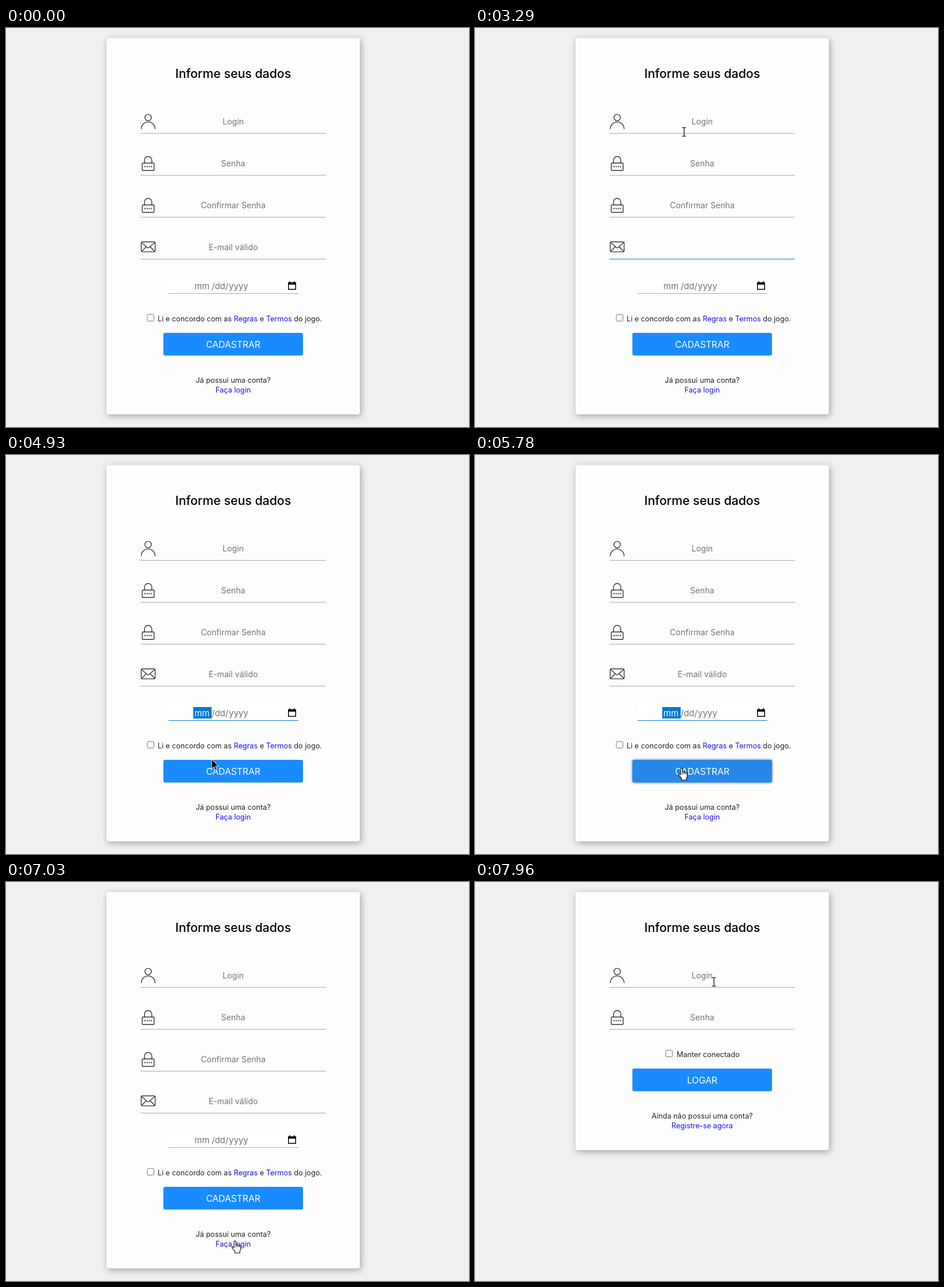
Recreate the animation shown at these times as an HTML page. Size 806 by 695 pixels, loop 8000 ms.

```html
<!DOCTYPE html>
<html lang="pt-BR">
<head>
<meta charset="utf-8">
<title>Cadastro</title>
<style>
  html, body { margin: 0; height: 100%; overflow: hidden; background: #f0f0f0; }
  svg { display: block; }
  text { font: 12.7px Inter, sans-serif; fill: #222; white-space: pre; }
  .mid { text-anchor: middle; }
  .title { font-size: 21.3px; font-weight: 500; fill: #000; }
  .hint { font-size: 14.1px; fill: #757575; }
  .date { font-size: 15px; fill: #757575; }
  .action { font-size: 15.7px; fill: #fff; }
  .link { fill: #1a10f0; }
  .line { fill: #aaa; }
  .icon { fill: none; stroke: #3a3338; stroke-width: 1.4; }
  .box { fill: #fff; stroke: #767676; }
  .focus .line { fill: #0f7ae0; }
  .field.focus .hint { visibility: hidden; }
  .mark { fill: #0078d7; visibility: hidden; }
  .focus .mark { visibility: visible; }
  .focus .month { fill: #fff; }
  #card { fill: #fdfdfd; filter: drop-shadow(2px 3px 6px rgba(45, 58, 72, .42)); }
  #cursor path { stroke-linejoin: round; }
</style>
</head>
<body>
<svg width="806" height="695" viewBox="0 0 806 695">
  <defs>
    <g id="user" class="icon">
      <circle cx="13.5" cy="8.5" r="5.6"/>
      <path d="M1.4 28.5a12.1 12.4 0 0 1 24.2 0"/>
    </g>
    <g id="lock" class="icon">
      <rect x="3.2" y="14.7" width="20.6" height="13" rx="1"/>
      <path d="M7.2 14.5V9.5a6.3 6.3 0 0 1 12.6 0v5"/>
      <path d="M7 21h13" stroke-width="2" stroke-dasharray="2 1.7"/>
    </g>
    <g id="mail" class="icon">
      <rect x="1.4" y="6" width="24.2" height="17.4" rx="2"/>
      <path d="M2 7l9.6 8.5q1.9 1.4 3.8 0L25 7M2 22.7l7.8-8M25 22.7l-7.8-8"/>
    </g>
  </defs>

  <rect id="card" x="175" y="17.5" width="441" rx="4"/>
  <text class="mid title" x="395.5" y="87">Informe seus dados</text>
  <g id="fields"></g>

  <g id="register">
    <g id="date">
      <rect x="283" y="436" width="226" height="26" fill="#fff"/>
      <rect class="line" x="283" y="462" width="226" height="1"/>
      <rect class="mark" x="326" y="439" width="32" height="20"/>
      <text class="date month" x="328" y="455">mm</text>
      <text class="date" x="358" y="455">/dd/</text>
      <text class="date" x="388" y="455">yyyy</text>
      <path d="M491 443h2.5v-2h1.5v2h6v-2h1.5v2h2.5v13h-14zM492.5 447v7.5h11V447z" fill="#000" fill-rule="evenodd"/>
    </g>
    <rect class="box" x="246" y="499" width="11.5" height="11.5" rx="2"/>
    <text x="264" y="510.5">Li e concordo com as <tspan class="link">Regras</tspan> e <tspan class="link">Termos</tspan> do jogo.</text>
    <rect id="button" x="274" y="531" width="243" height="39.5" rx="3"/>
    <text class="mid action" x="395.5" y="556.5">CADASTRAR</text>
    <text class="mid" x="395.5" y="617.5">Já possui uma conta?</text>
    <text id="loginLink" class="mid link" x="395.5" y="634.5">Faça login</text>
  </g>

  <g id="login">
    <rect class="box" x="332" y="293" width="11.5" height="11.5" rx="2"/>
    <text x="351" y="304.5">Manter conectado</text>
    <rect x="274" y="325" width="243" height="39.5" rx="3" fill="#198bff"/>
    <text class="mid action" x="395.5" y="350.5">LOGAR</text>
    <text class="mid" x="395.5" y="411.5">Ainda não possui uma conta?</text>
    <text class="mid link" x="395.5" y="428.5">Registre-se agora</text>
  </g>

  <rect id="caret" x="395" width="1" height="16"/>
  <g id="cursor">
    <path data-kind="arrow" d="M0 0V16.5L3.8 13l2.8 6 2.6-1.1L6.5 12H12z" fill="#000" stroke="#fff"/>
    <path data-kind="beam" d="M-3.5 -7.5h2.5q1 0 1 1q0-1 1-1h2.5M0 -7V7M-3.5 7.5h2.5q1 0 1-1q0 1 1 1h2.5" fill="none" stroke="#000" stroke-width="1.2"/>
    <path data-kind="hand" transform="translate(-5 0)" d="M4 12V2a1.6 1.6 0 0 1 3.2 0v5q1.6-1.3 2.9.4 1.7-1 2.8.7 2.3-.6 2.6 1.4V14q0 2-1.5 4v3.3H5.6V18.5L1 12.8q-1.2-2 .5-2.6 1.2 0 2.5 1.8zM7.2 7v4M10.1 7.5V11M12.9 8v3" fill="#fff" stroke="#000" stroke-width="1.1"/>
  </g>
</svg>
<script>
const LOOP = 8000, PAGE_SWAP = 7190, BLUR = 6960;
const $ = id => document.getElementById(id);
const show = (el, on) => el.style.display = on ? '' : 'none';

const lineY = [183, 256, 329, 402];
const hints = ['Login', 'Senha', 'Confirmar Senha', 'E-mail válido'];
const icons = ['user', 'lock', 'lock', 'mail'];
$('fields').innerHTML = hints.map((hint, i) => `
  <g class="field">
    <use href="#${icons[i]}" x="234" y="${lineY[i] - 35.5}"/>
    <text class="mid hint" x="395.5" y="${lineY[i] - 15}">${hint}</text>
    <rect class="line" x="234" y="${lineY[i]}" width="323" height="1"/>
  </g>`).join('');
const fields = [...document.querySelectorAll('.field'), $('date')];

// [start, field index, time the caret blinks off]
const focuses = [[880, 0, 1270], [1270, 1, 1800], [2030, 2, 2600], [2810, 3, 3290], [3680, 4, 0], [BLUR, -1, 0]];

// [first step, last step, steps, x, y]
const moves = [
  [70, 470, 6, 280, 155],
  [630, 797, 3, 364, 181],
  [4140, 4930, 11, 358, 530],
  [4990, 5250, 4, 359, 544],
  [5780, 5780, 1, 359, 545],
  [6270, 6640, 6, 398, 625],
  [7350, 7960, 9, 416, 174],
];

const stepped = (t, start, end, steps) => t < start ? 0 :
  Math.min(steps, Math.floor((t - start) / ((end - start) / (steps - 1) || 1) + 1e-6) + 1) / steps;

function cursorAt(t) {
  let x = 860, y = 790;
  for (const [start, end, steps, toX, toY] of moves) {
    const p = stepped(t, start, end, steps);
    x += (toX - x) * p;
    y += (toY - y) * p;
  }
  return [Math.round(x), Math.round(y)];
}

function cursorKind(x, y, t) {
  const inside = (left, top, right, bottom) => x >= left && x <= right && y >= top && y <= bottom;
  const registering = t < 7350;
  const inputs = registering ? lineY : lineY.slice(0, 2);
  if (inputs.some(line => inside(234, line - 36, 557, line))) return 'beam';
  if (registering && inside(283, 436, 509, 462)) return 'beam';
  if (registering && (inside(274, 531, 517, 570) || inside(364, 622, 427, 638))) return 'hand';
  return 'arrow';
}

function render(t) {
  const registering = t < PAGE_SWAP;
  $('card').setAttribute('height', registering ? 655.5 : 449.5);
  show($('register'), registering);
  show($('login'), !registering);

  const [, focused, caretOff] = focuses.findLast(f => t >= f[0]) || [0, -1, 0];
  fields.forEach((field, i) => {
    field.classList.toggle('focus', i === focused);
    if (i === 2 || i === 3) show(field, registering);
  });
  show($('caret'), t < caretOff);
  if (t < caretOff) $('caret').setAttribute('y', lineY[focused] - 28);

  const hover = stepped(t, 4990, 5250, 4) - stepped(t, 6337, 6640, 5);
  const mix = (from, to) => from + (to - from) * hover;
  $('button').style.fill = `rgb(${mix(25, 38)}, ${mix(139, 136)}, ${mix(255, 233)})`;
  $('button').style.filter = hover ? `drop-shadow(0 0 2px rgba(20, 70, 125, ${hover * .75}))` : 'none';
  $('loginLink').style.fill = t >= BLUR && t < 7030 ? '#f00' : '';

  const [x, y] = cursorAt(t), kind = cursorKind(x, y, t);
  $('cursor').setAttribute('transform', `translate(${x} ${y})`);
  for (const shape of $('cursor').children) show(shape, shape.dataset.kind === kind);
}

const began = performance.now();
function tick() {
  render((performance.now() - began) % LOOP);
  requestAnimationFrame(tick);
}
tick();
</script>
</body>
</html>
```
